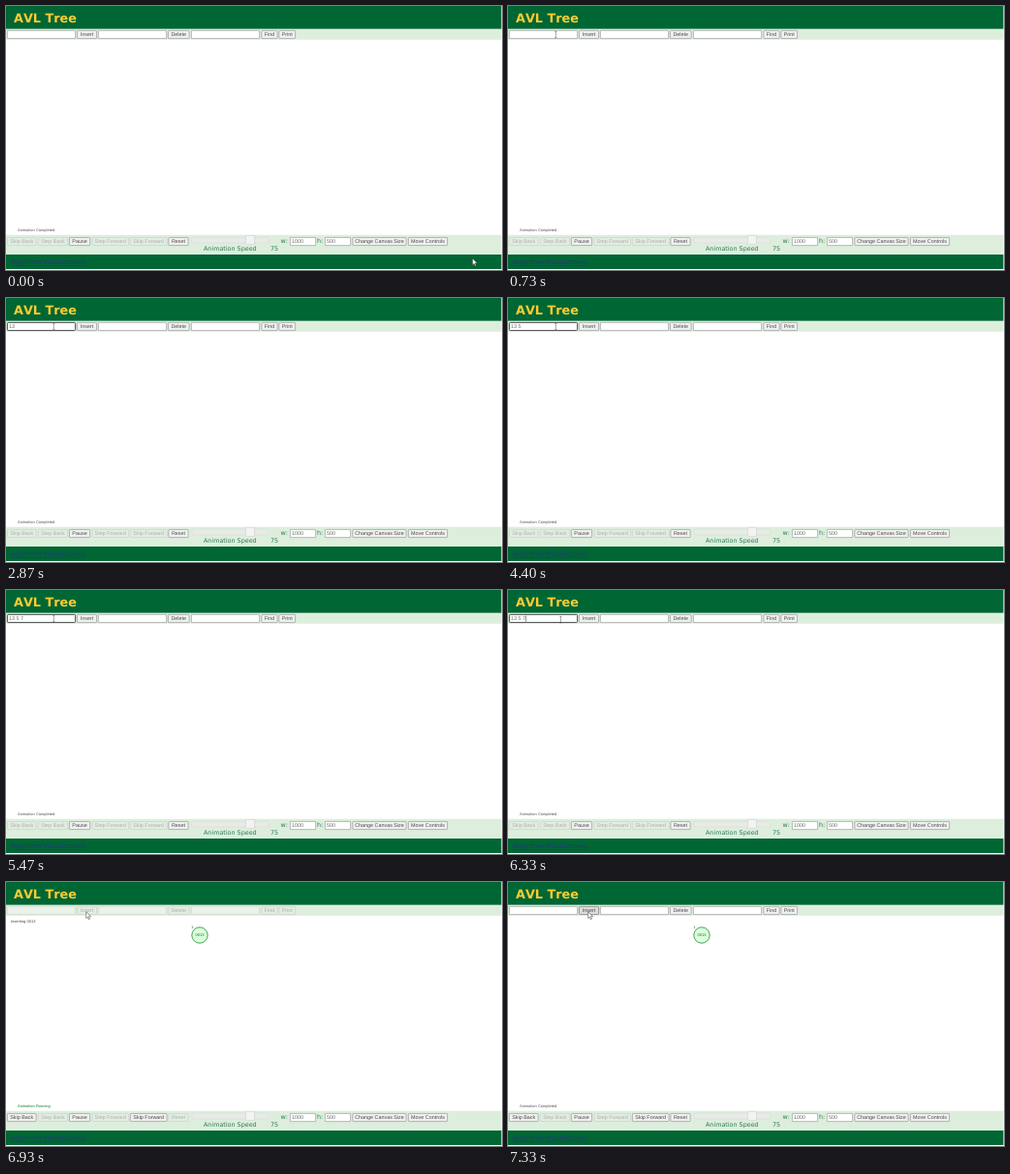
An HTML page for the animation above (8000 ms loop, 512x273 px).

```html
<!DOCTYPE html>
<html lang="en">
<head>
<meta charset="utf-8">
<title>AVL Tree</title>
<style>
  html, body { margin: 0; width: 100%; height: 100%; overflow: hidden; background: #fff; }
  svg { display: block; width: 512px; height: 273px; text-rendering: geometricPrecision; font-kerning: none; }
  text { font-family: "Liberation Sans", Arial, sans-serif; font-size: 5.4px; white-space: pre; }
  .ui { font-family: "DejaVu Sans", Verdana, sans-serif; font-size: 6.4px; fill: #2f7a55; }
  .title { font-family: "DejaVu Sans", Verdana, sans-serif; font-size: 12.8px; font-weight: bold; fill: #fc3; }
  .small { font-size: 4px; }
  .mid { text-anchor: middle; }
</style>
</head>
<body>
<svg id="stage" viewBox="0 0 512 273"></svg>
<script>
const LOOP = 8000, TICK = 200 / 3;
const stage = document.getElementById('stage');

const rect = (x, y, w, h, fill, extra = '') =>
  `<rect x="${x}" y="${y}" width="${w}" height="${h}" fill="${fill}" ${extra}/>`;
const text = (x, y, s, cls = '', fill = '') =>
  `<text x="${x}" y="${y}" class="${cls}" ${fill && `fill="${fill}"`}>${s}</text>`;
const edge = (color, width = 0.6, r = 0.7) =>
  `stroke="${color}" stroke-width="${width}" rx="${r}"`;

function button(x1, x2, y, label, on, hot = false) {
  const fill = hot ? '#dcdcdc' : on ? '#f0f0f0' : '#e3ece3';
  const line = hot ? '#666' : on ? '#8a8a8a' : '#c6cfc6';
  return rect(x1 + .4, y + .4, x2 - x1 - .8, 8.2, fill, edge(line)) +
    text((x1 + x2) / 2, y + 6.4, label, 'mid', on ? '#4a4a4a' : '#a9b1a9');
}

function field(x1, x2, y, value = '', on = true, focus = false) {
  const style = focus ? edge('#222', .8, 1) : edge(on ? '#909090' : '#cbd3cb', .6, .2);
  return rect(x1 + .4, y + .4, x2 - x1 - .8, 8.2, on ? '#fff' : '#eaf2ea', style) +
    text(x1 + 2, y + 6.4, value, '', '#666');
}

const arrow = (x, y) =>
  `<path transform="translate(${x} ${y})" d="M0 0V6.9L1.6 5.4 2.7 8 3.8 7.5 2.7 5H4.9Z"
    fill="#fff" stroke="#333" stroke-width=".5"/>`;
const beam = (x, y) =>
  `<path transform="translate(${x} ${y})" d="M-1-3.2H1M0-3.2V3.2M-1 3.2H1"
    fill="none" stroke="#444" stroke-width=".5"/>`;

// time, typed text
const typed = [[0, ''], [2070, '1'], [2330, '13'], [3000, '13 '], [3470, '13 5'], [3870, '13 5 '], [4930, '13 5 7']];
// caret blink: visible spans
const blinks = [[870, 1400], [1930, 2870], [3000, 4400], [4930, 5470], [6000, 6730]];

const ease = p => p * p * (3 - 2 * p);
const clamp = p => Math.max(0, Math.min(1, p));

function pointer(t) {
  const q = Math.floor((t + 4) / TICK) * TICK;
  const a = ease(clamp(q / (11 * TICK)));
  const b = ease(clamp((q - 94 * TICK) / (7 * TICK)));
  if (t < 6320) {
    const x = 481.5 + (49.3 - 481.5) * a, y = 261 + (29.6 - 261) * a;
    return a > .995 ? beam(x, y) : arrow(x, y);
  }
  const x = 52.7 + 30 * b, y = 30.7;
  return x < 72 ? beam(x, y) : arrow(x, y);
}

function scene(t) {
  const started = t >= 6865, running = started && t < 7265, idle = !running;
  const focus = t >= 870 && t < 6730;
  const value = started ? '' : typed.filter(e => t >= e[0]).pop()[1];
  const caret = blinks.some(([a, b]) => t >= a && t < b);
  const caretX = 3.2 + [...value].reduce((w, c) => w + (c === ' ' ? 1.5 : 3), 0);
  const hot = idle && t >= 6660;

  let s = rect(0, 0, 511.4, 23.8, '#063') + text(8, 16.6, 'AVL Tree', 'title') +
    rect(0, 23.8, 511.4, 11, '#ded') + rect(0, 236.7, 511.4, 20.3, '#ded') +
    rect(0, 257, 511.4, 15, '#063') +
    '<text x="5" y="267" class="ui" style="fill:#26358c" text-decoration="underline">Algorithm Visualizations</text>';

  s += field(1, 72, 25, value, idle, focus) + button(73, 94, 25, 'Insert', idle, hot) +
    field(95, 166, 25, '', idle) + button(167, 189.5, 25, 'Delete', idle) +
    field(191, 262, 25, '', idle) + button(263.5, 280.5, 25, 'Find', idle) +
    button(281.5, 299, 25, 'Print', idle);
  if (caret) s += rect(caretX, 26.6, .5, 6, '#222');

  if (started) {
    s += '<circle cx="200" cy="55" r="8.2" fill="#dfd" stroke="#007a1f" stroke-width=".7"/>' +
      text(200, 56.4, '0013', 'small mid', '#070') + text(192.3, 48.4, '1', 'small mid', '#262');
  }
  if (running) s += text(5, 42.4, 'Inserting 0013', 'small', '#444');
  s += text(12, 232.8, running ? 'Animation Running' : 'Animation Completed', 'small', running ? '#0a7a2a' : '#555');

  s += button(1, 31.5, 239, 'Skip Back', started) + button(33, 64, 239, 'Step Back', false) +
    button(65, 87, 239, 'Pause', true) + button(88.5, 127, 239, 'Step Forward', false) +
    button(128, 166.5, 239, 'Skip Forward', started) + button(167.5, 188.5, 239, 'Reset', idle);

  s += rect(192, 239.3, 79, 5.6, '#e8ebe8', edge('#cfd5cf', .4)) +
    rect(247.4, 237.4, 9.2, 9, '#f3f3f3', edge('#c4c8c4', .5)) +
    text(204, 252.7, 'Animation Speed', 'ui') + text(273, 252.5, '75', 'ui');
  s += text(283.5, 245.2, 'w:', 'ui') + field(293, 320, 239, '1000') +
    text(321, 245.2, 'h:', 'ui') + field(329, 356, 239, '500') +
    button(357.5, 413.5, 239, 'Change Canvas Size', true) + button(415, 456, 239, 'Move Controls', true);

  return s + pointer(t);
}

let shown = '';
const begin = performance.now();
function draw() {
  const next = scene((performance.now() - begin) % LOOP);
  if (next !== shown) stage.innerHTML = shown = next;
  requestAnimationFrame(draw);
}
draw();
</script>
</body>
</html>
```
